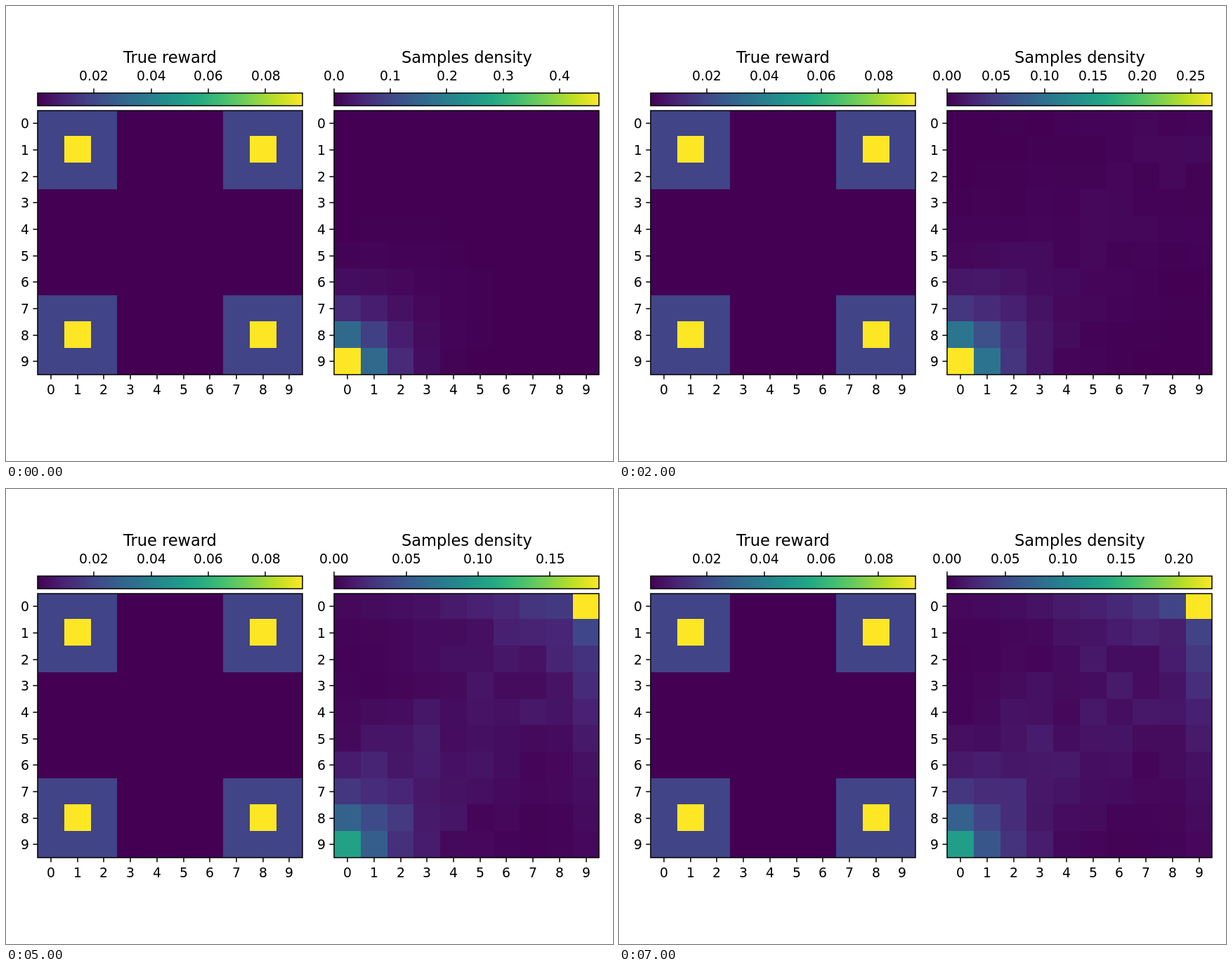
An HTML page with a canvas that plays this animation: 864 px wide and 648 px high, repeating every 8 s.

```html
<!DOCTYPE html>
<html lang="en">
<head>
<meta charset="utf-8">
<title>Reward and sample density</title>
<style>
  html, body { margin: 0; width: 100%; height: 100%; overflow: hidden; background: #fff; }
  canvas { display: block; width: 864px; height: 648px; }
</style>
</head>
<body>
<canvas id="stage" width="864" height="648"></canvas>
<script>
const ctx = document.getElementById('stage').getContext('2d');
const SIZE = 10, STEP_MS = 1000, LINE = 1.5, TICK = 6.56, LEFT = 45.2, GAP = 45.1;
const WIDE = 377.05, NARROW = 371.2;
const FONT = '"DejaVu Sans", Verdana, sans-serif';

// Sample density at the starting corner and at the opposite corner, per step.
const NEAR = [0.471, 0.451, 0.272, 0.2064, 0.1668, 0.105, 0.117, 0.127];
const FAR = [0, 0, 0.003, 0.029, 0.105, 0.1842, 0.2135, 0.2285];

const VIRIDIS = ['440154', '482475', '414487', '355f8d', '2a788e', '21918c',
  '22a884', '44bf70', '7ad151', 'bddf26', 'fde725']
  .map(hex => [0, 2, 4].map(i => parseInt(hex.slice(i, i + 2), 16)));

const clamp = v => Math.min(1, Math.max(0, v));

function viridis(v) {
  const p = clamp(v) * 10;
  const i = Math.min(9, Math.floor(p));
  const rgb = VIRIDIS[i].map((a, k) => Math.round(a + (VIRIDIS[i + 1][k] - a) * (p - i)));
  return `rgb(${rgb})`;
}

function randomFrom(seed) {
  return () => {
    seed = (seed * 16807) % 2147483647;
    return seed / 2147483647;
  };
}

const makeGrid = rule => Array.from({ length: SIZE }, (_, r) =>
  Array.from({ length: SIZE }, (_, c) => rule(r, c)));

// Samples fade away from the start, later fill the rising diagonal,
// and finally gather along the edges that meet at the far corner.
function densityAt(step) {
  const max = Math.max(NEAR[step], FAR[step]);
  const near = NEAR[step] / max, far = FAR[step] / max;
  const spread = clamp((step - 1) / 3);
  const random = randomFrom(7919 * (step + 1));

  const grid = makeGrid((r, c) => {
    const up = 9 - r, back = 9 - c;
    const noise = 0.3 + 1.4 * random();
    if (up + c === 0) return near;
    if (r + back === 0) return far;
    const aside = (c - up) ** 2;
    const trail = near * (0.38 + 0.12 * spread) * Math.exp(-aside / 9)
      * Math.exp(-(up + c - 1) / (1.4 + 0.9 * spread));
    const edge = far * 0.15 * Math.exp(-(r + back - 1) / 4 - 0.7 * Math.min(r, back));
    const ridge = 0.04 * spread * noise * Math.exp(-aside / 18);
    return trail + edge + ridge;
  });

  const tickStep = max > 0.3 ? 0.1 : 0.05;
  const lastTick = Math.floor(max / tickStep) * tickStep;
  // A last label close to the bar's end makes the layout shrink.
  const width = lastTick / max > 0.95 ? NARROW : WIDE;
  return { grid, max, tickStep, width };
}

const STATES = NEAR.map((_, step) => densityAt(step));

// Each quadrant holds a 3x3 block with a peak in its middle.
const REWARD = makeGrid((r, c) => {
  const dr = Math.abs(Math.abs(r - 4.5) - 3.5);
  const dc = Math.abs(Math.abs(c - 4.5) - 3.5);
  return dr > 1 || dc > 1 ? 0 : dr + dc === 0 ? 1 : 0.2;
});

// anchor: 0 starts at x, 0.5 centres on it, 1 ends there.
function text(label, x, y, anchor = 0.5, size = 18.75) {
  ctx.font = `${size}px ${FONT}`;
  ctx.fillStyle = '#000';
  ctx.fillText(label, Math.round(x - ctx.measureText(label).width * anchor), Math.round(y));
}

function line(x1, y1, x2, y2) {
  ctx.beginPath();
  ctx.moveTo(x1, y1);
  ctx.lineTo(x2, y2);
  ctx.stroke();
}

function panel(title, left, width, grid, min, max, firstTick, tickStep) {
  const barHeight = width * 0.05, pad = 6.75, cell = width / SIZE;
  const barTop = 324 - (width + barHeight + pad) / 2;
  const top = barTop + barHeight + pad;

  // Edges snapped to whole pixels
  const x1 = Math.round(left), x2 = Math.round(left + width);
  const y1 = Math.round(top + 0.4), y2 = Math.round(top + width);
  const bar1 = Math.round(barTop + 0.85), bar2 = Math.round(barTop + barHeight + 0.85);
  const colX = c => Math.round(left + c * cell);
  const rowY = r => Math.floor(top + r * cell);

  for (let r = 0; r < SIZE; r++)
    for (let c = 0; c < SIZE; c++) {
      const y = Math.max(y1, rowY(r));
      ctx.fillStyle = viridis(grid[r][c]);
      ctx.fillRect(colX(c), y, colX(c + 1) - colX(c), rowY(r + 1) - y);
    }

  for (let x = x1; x < x2; x++) {
    ctx.fillStyle = viridis((x + 0.5 - left) / width);
    ctx.fillRect(x, bar1, 1, bar2 - bar1);
  }

  ctx.strokeStyle = '#000';
  ctx.lineWidth = LINE;
  ctx.strokeRect(x1, y1, x2 - x1, y2 - y1);
  ctx.strokeRect(x1, bar1, x2 - x1, bar2 - bar1);

  for (let i = 0; i < SIZE; i++) {
    const x = left + (i + 0.5) * cell, y = top + (i + 0.5) * cell;
    line(Math.round(x), y2, Math.round(x), y2 + TICK);
    line(x1, Math.round(y), x1 - TICK, Math.round(y));
    text(i, x, top + width + 27.6);
    text(i, left - 12.6, y + 7, 1);
  }

  const digits = tickStep < 0.1 ? 2 : 1;
  for (let v = firstTick; v <= max; v += tickStep) {
    const x = left + (v - min) / (max - min) * width;
    line(Math.round(x), bar1, Math.round(x), bar1 - TICK);
    text(v.toFixed(digits), x, barTop - 16.5);
  }
  text(title, left + width / 2, barTop - 42, 0.5, 22.5);
}

function draw(time) {
  const { grid, max, tickStep, width } = STATES[Math.floor(time / STEP_MS) % STATES.length];
  ctx.fillStyle = '#fff';
  ctx.fillRect(0, 0, 864, 648);
  panel('True reward', LEFT, width, REWARD, 0.00037, 0.09296, 0.02, 0.02);
  panel('Samples density', LEFT + width + GAP, width, grid, 0, max, 0, tickStep);
}

const origin = performance.now();
function tick() {
  draw(performance.now() - origin);
  requestAnimationFrame(tick);
}
tick();
</script>
</body>
</html>
```
